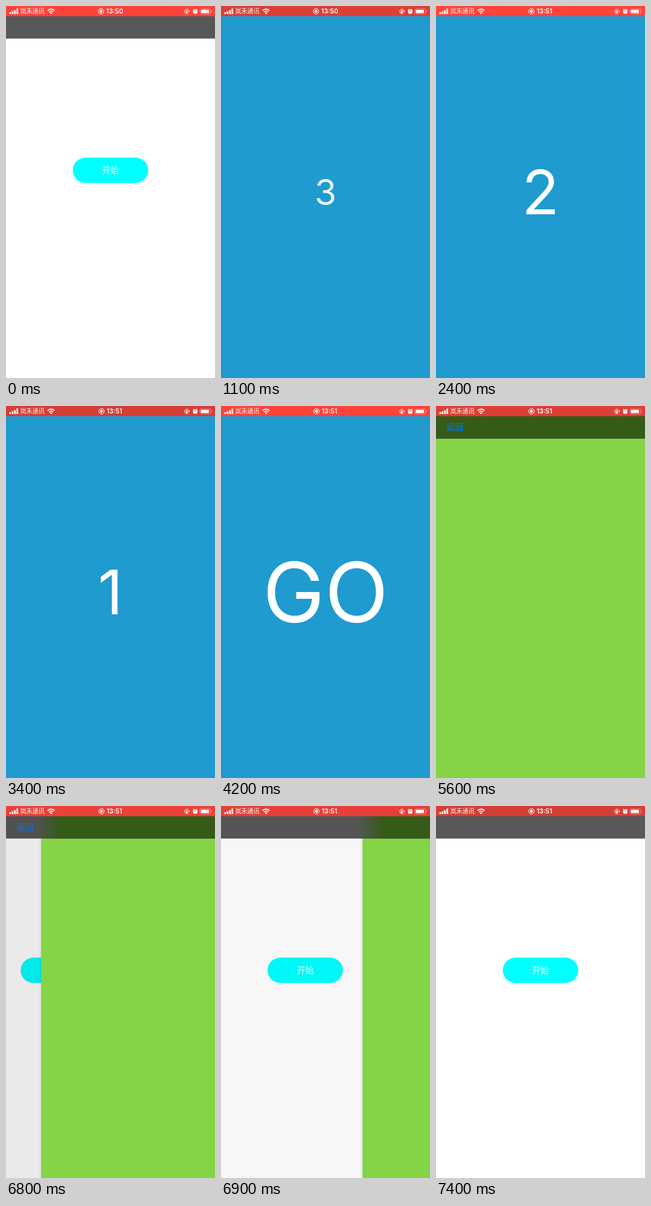
Write an HTML page that moves like this. It is 338 px wide and 600 px high and loops after 7.5 s.

```html
<!DOCTYPE html>
<html lang="zh">
<head>
<meta charset="utf-8">
<style>
  html, body { margin: 0; width: 100%; height: 100%; overflow: hidden; background: #fff; }
  svg { display: block; width: 338px; height: 600px; }
  text { font-family: "Noto Sans CJK SC", "Noto Sans CJK", sans-serif; }
  .latin { font-family: Inter, sans-serif; }
</style>
</head>
<body>
<svg viewBox="0 0 338 600">
  <defs>
    <linearGradient id="edge" gradientUnits="userSpaceOnUse" x1="0" y1="0" x2="40" y2="0">
      <stop offset="0" stop-color="#365b19" stop-opacity="0"/>
      <stop offset="1" stop-color="#365b19"/>
    </linearGradient>
    <linearGradient id="shade">
      <stop offset="0" stop-opacity="0"/>
      <stop offset="1" stop-opacity=".08"/>
    </linearGradient>
  </defs>

  <rect width="338" height="600" fill="#fff"/>
  <g id="home">
    <rect x="108" y="244.6" width="122" height="40.8" rx="20.4" fill="#0ff"/>
    <text id="start" x="169" y="270" font-size="13.6" text-anchor="middle" fill="#fff">开始</text>
  </g>
  <rect id="dim" width="338" height="600" opacity="0"/>
  <g id="next">
    <rect x="-4" width="4" height="600" fill="url(#shade)"/>
    <rect width="338" height="600" fill="#84d446"/>
  </g>

  <g id="nav">
    <rect id="navBase" width="338" height="52.4" fill="#585858"/>
    <g id="navTint"><rect width="420" height="52.4" fill="url(#edge)"/></g>
    <rect y="51.6" width="338" height=".8" opacity=".2"/>
    <text id="back" x="17" y="39.3" font-size="13.6" fill="#007aff">返回</text>
  </g>

  <g id="cover">
    <rect width="338" height="600" fill="#1f9bd0"/>
    <g id="count">
      <text id="digit" class="latin" y="36" font-size="99" text-anchor="middle" fill="#fff"></text>
    </g>
  </g>

  <rect id="bar" width="338" height="16.4"/>
  <g fill="#fff">
    <path d="M5.6 10h2.6v3H5.6zM9.4 8.4H12V13H9.4zM13.2 6.4h2.6V13h-2.6zM17 4h2.6v9H17z"/>
    <text x="23" y="12.2" font-size="9.8">岚禾通讯</text>
    <g fill="none" stroke="#fff" stroke-width="1.7">
      <path d="M67.3 7.4a8.2 8.2 0 0 1 11.2 0M69.4 9.7a5.2 5.2 0 0 1 7 0"/>
    </g>
    <path d="M70.9 11.2a3 3 0 0 1 4 0l-2 2z"/>
    <g id="clock">
      <circle cx="153.7" cy="8.5" r="4.4" fill="none" stroke="#fff"/>
      <circle cx="153.7" cy="8.5" r="2.4"/>
      <text id="time" class="latin" x="162" y="12.3" font-size="10.4" font-weight="600"></text>
    </g>
    <g fill="none" stroke="#fff" stroke-width=".9">
      <path d="M295.4 11.3a3.7 3.7 0 1 1 .8-3.2"/>
      <path d="M291.6 8.6v-.7a.9.9 0 0 1 1.8 0v.7"/>
    </g>
    <path d="M290.9 8.5h3.2v2.4h-3.2zM294.8 8h2.8l-1.4 2z"/>
    <circle cx="306" cy="9" r="3.6"/>
    <path d="M302.4 6.8a1.6 1.6 0 0 1 2.3-2zM309.6 6.8a1.6 1.6 0 0 0-2.3-2zM303.2 11l1 1-1 .8zM308.8 11l-1 1 1 .8z"/>
    <path id="hands" d="M306 6.6V9.2h-1.6" fill="none" stroke-width=".8"/>
    <rect x="313.5" y="4.9" width="17.8" height="7.6" rx="2.2" fill="none" stroke="#fff" stroke-width=".8" stroke-opacity=".55"/>
    <rect x="315" y="6.2" width="13.2" height="5" rx="1"/>
    <path d="M332.1 7.3q1.4 1.4 0 2.8z" opacity=".6"/>
  </g>
</svg>
<script>
  const LOOP = 7500, TICK = 100, W = 338;
  const COVER_ON = 900, COUNT_ON = 1024, STEP = 1010, COVER_OFF = 5070;
  const POP = 6754, POP_END = 7400;
  const LABELS = ['3', '2', '1', 'GO'];

  const el = {};
  document.querySelectorAll('[id]').forEach(e => el[e.id] = e);

  const clamp = v => Math.max(0, Math.min(1, v));
  const ramp = (t, a, b) => clamp((t - a) / (b - a));
  const smooth = v => v * v * (3 - 2 * v);
  const mix = (a, b, k) => a + (b - a) * k;
  const rgb = (a, b, k) => `rgb(${a.map((v, i) => Math.round(mix(v, b[i], k)))})`;
  const set = (e, attrs) => { for (const k in attrs) e.setAttribute(k, attrs[k]); };
  const show = (e, on) => set(e, { visibility: on ? 'visible' : 'hidden' });
  const shift = x => `translate(${x} 0)`;

  // Critically damped spring
  function spring(t) {
    if (t <= POP) return 0;
    if (t >= POP_END) return 1;
    const u = (t - POP) * 0.016;
    return 1 - (1 + u) * Math.exp(-u);
  }

  function drawStatus(t) {
    const glow = t < 600 ? 1 : (1 + Math.cos((t - 6330) / 1000 * Math.PI)) / 2;
    const color = rgb([214, 62, 54], [255, 67, 58], glow);
    set(el.bar, { fill: color });
    set(el.hands, { stroke: color });
    const late = t >= 2000;
    el.time.textContent = late ? '13:51' : '13:50';
    set(el.clock, { transform: shift(late ? 0.7 : 0) });
  }

  function drawCount(t) {
    const on = t >= COVER_ON && t < COVER_OFF;
    show(el.cover, on);
    if (!on) return;
    const i = Math.max(0, Math.min(3, Math.floor((t - COUNT_ON) / STEP)));
    const age = t - COUNT_ON - i * STEP;
    const size = 1.5 * smooth(ramp(age, 0, 180)) - 0.5 * smooth(ramp(age, 200, 340));
    el.digit.textContent = LABELS[i];
    set(el.count, { transform: `translate(169 300) scale(${size})`, opacity: clamp(size * 1.55) });
  }

  function drawPages(t) {
    const p = spring(t);
    const pushed = t >= COVER_OFF && p < 1;
    const away = pushed ? 1 - p : 0;
    set(el.home, { transform: shift(-0.3 * W * away) });
    set(el.start, { opacity: t >= 600 && t < COVER_ON ? 0.3 : 1 });
    set(el.dim, { opacity: 0.1 * away });
    set(el.next, { transform: shift(W * p) });
    set(el.navBase, { fill: rgb([88, 88, 88], [79, 79, 79], away) });
    set(el.navTint, {
      transform: shift(W * p - 8 - 32 * Math.exp(-20 * p)),
      opacity: ramp(t, 5000, 5600)
    });
    const pressed = t >= 6500 && t < POP;
    set(el.back, { opacity: pressed ? 0.4 : ramp(t, 5000, 5500) * clamp(1 - 1.5 * p) });
    [el.next, el.navTint, el.back].forEach(e => show(e, pushed));
  }

  const origin = performance.now();
  function frame(now) {
    const t = Math.floor(Math.max(0, now - origin) % LOOP / TICK) * TICK;
    drawPages(t);
    drawCount(t);
    drawStatus(t);
    requestAnimationFrame(frame);
  }
  frame(origin);
</script>
</body>
</html>
```
